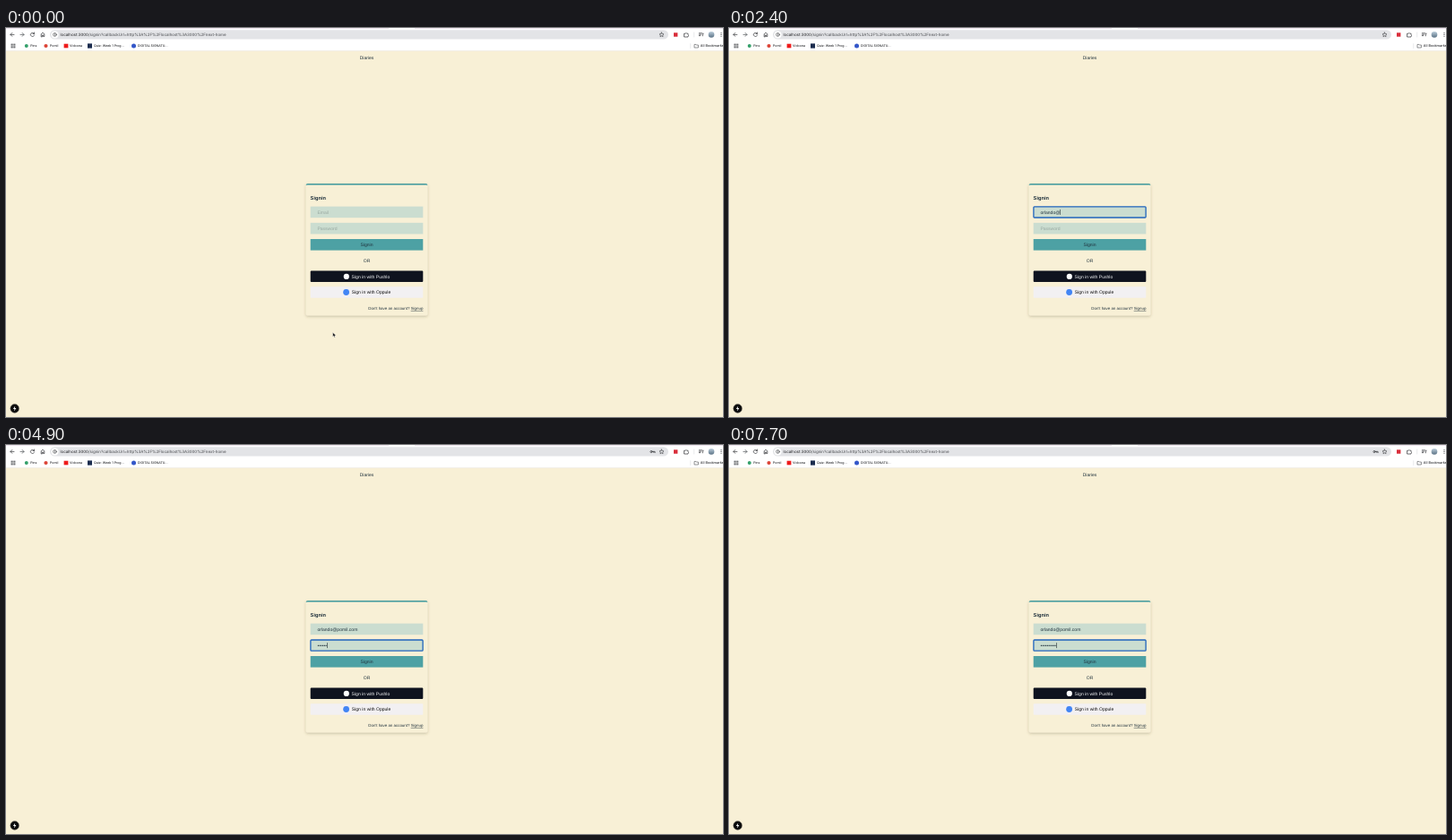
Write an HTML page that moves like this. It is 800 by 435 pixels and loops after 8 s.

```html
<!DOCTYPE html>
<html lang="en">
<head>
<meta charset="utf-8">
<title>Signin</title>
<style>
  html, body { margin: 0; width: 100%; height: 100%; overflow: hidden; background: #f8f0d6; }
  svg { display: block; width: 800px; height: 435px; }
  text { font: 5.05px "Liberation Sans", Arial, sans-serif; fill: #20323d; text-rendering: geometricPrecision; white-space: pre; }
  .mid { text-anchor: middle; }
  .end { text-anchor: end; }
  .hint { fill: #98a8a0; }
  .ui text { font: 500 3.55px Inter, sans-serif; fill: #2c2d30; }
  .ui .url { font: 400 4.46px Inter, sans-serif; fill: #45474b; }
  .ui .host { fill: #1c1d20; }
  .line { fill: none; stroke: #3b3d41; stroke-width: .75; stroke-linecap: round; stroke-linejoin: round; }
  .menu text { font: 400 4.05px "Liberation Sans", sans-serif; fill: #e4e4e8; }
  .menu .bold { font-weight: 700; fill: #fff; }
  .ring { fill: none; stroke: #2265bd; stroke-width: 1.3; }
</style>
</head>
<body>
<svg viewBox="0 0 800 435">
  <defs>
    <filter id="soft" x="-10%" y="-10%" width="120%" height="125%">
      <feDropShadow dx="0" dy="1.2" stdDeviation="1.5" flood-color="#5b5030" flood-opacity=".3"/>
    </filter>
    <linearGradient id="face" x2="0" y2="1">
      <stop stop-color="#b9cbd8"/><stop offset="1" stop-color="#5c7386"/>
    </linearGradient>
  </defs>
  <rect width="800" height="435" fill="#f8f0d6"/>

  <g class="ui">
    <rect width="800" height="25.6" fill="#fff"/>
    <rect width="427" height=".8" fill="#eadfea"/>
    <rect x="456" width="344" height=".8" fill="#eadfea"/>
    <rect y="25.3" width="800" height=".5" fill="#e6e3dc"/>
    <rect x="49" y="2.2" width="690" height="10.4" rx="5.2" fill="#e3e4e7"/>
    <circle cx="54.5" cy="7.4" r="4" fill="#fff"/>
    <g class="line">
      <path d="M9 7.4H5M6.8 5.5 5 7.4 6.8 9.3"/>
      <path d="M16 7.4h4M18.2 5.5 20 7.4 18.2 9.3" stroke="#55585d"/>
      <path d="M31.3 6.2A2.1 2.1 0 1 0 31.6 8M31.6 5v1.5h-1.5"/>
      <path d="M39.2 9.5V6.8L41 5.2l1.8 1.6v2.7h-1.2V8h-1.2v1.5z"/>
      <circle cx="54.5" cy="7.4" r="1.9" stroke-width=".6"/>
      <path d="M54.5 7.2v1.1M54.5 6.3v.05" stroke-width=".5"/>
      <path d="m731.5 5 .75 1.6 1.75.2-1.3 1.2.35 1.7-1.55-.85-1.55.85.35-1.7-1.3-1.2 1.75-.2z" stroke-width=".6"/>
      <path d="M757 6.2h1.2a.8.8 0 0 1 1.5 0H761v1.3a.8.8 0 0 1 0 1.5v1h-4z"/>
      <path d="M773.3 5.8h3.2M773.3 7.2h2.2M773.3 8.6h1.4"/>
      <path d="M777.3 8.8V6.2h.9"/>
      <path d="M767.7 5v5M763.7 17.7v4.8" stroke="#d2d5da" stroke-width=".5"/>
      <path d="M768 21.6v-3.2h1.7l.5.6h2.2v2.6z" stroke-width=".55"/>
    </g>
    <g id="key">
      <circle cx="720" cy="7.5" r="1.1" class="line"/>
      <path class="line" d="M721.2 7.3h2.9v1.3M722.8 7.4v1"/>
    </g>
    <rect x="745" y="5.3" width="4.4" height="4.4" fill="#d92d3a"/>
    <circle cx="787" cy="7.4" r="3.3" fill="url(#face)"/>
    <g id="dots" fill="#3b3d41"></g>
    <text class="url" x="60.4" y="9"><tspan class="host">localhost:3000</tspan>/signin?callbackUrl=http%3A%2F%2Flocalhost%3A3000%2Fnext-home</text>

    <circle cx="22.8" cy="20" r="2" fill="#34a06a"/>
    <text x="27.2" y="21.3">Pins</text>
    <circle cx="44.5" cy="20" r="2.1" fill="#dc4437"/>
    <text x="49" y="21.3">Pomil</text>
    <rect x="64.6" y="17.7" width="4.8" height="4.6" fill="#ee1c1c"/>
    <text x="71" y="21.3">Vidoona</text>
    <rect x="91" y="17.4" width="5" height="5.2" fill="#1c2c4e"/>
    <text x="98" y="21.3">Quiz: Week 1 Prog...</text>
    <circle cx="142.5" cy="20" r="2.5" fill="#3457c9"/>
    <text x="147" y="21.3">DIGITAL SIGNATU...</text>
    <text x="774.8" y="21.4" style="font-size:3.8px">All Bookmarks</text>
  </g>

  <text class="mid" x="402.5" y="34.9">Diaries</text>

  <g filter="url(#soft)">
    <rect x="334.6" y="174" width="135.8" height="147.6" rx="2" fill="#f8f0d6"/>
  </g>
  <path d="M334.6 176a2 2 0 0 1 2-2h131.8a2 2 0 0 1 2 2l-1.4-.6H336z" fill="#3f999d"/>
  <text x="339.6" y="191.8" style="font-size:5.68px;font-weight:700">Signin</text>
  <rect x="339.7" y="199.6" width="125.6" height="12.6" fill="#cbddd0"/>
  <rect x="339.7" y="217.8" width="125.6" height="12.6" fill="#cbddd0"/>
  <rect id="sel" y="220.6" height="6.8" fill="#86afe0"/>
  <text id="mail" x="347.4" y="207.6"></text>
  <text id="pass" x="347.4" y="225.8"></text>
  <rect id="ring" class="ring" x="339.9" width="125.2" height="12.2" rx="1"/>
  <rect id="caret" width=".6" height="6" fill="#222e33"/>
  <rect x="339.7" y="236" width="125.6" height="12.6" fill="#4da1a4"/>
  <text class="mid" x="402.5" y="244">Signin</text>
  <text class="mid" x="402.5" y="261.9">OR</text>
  <rect x="339.7" y="271.6" width="125.6" height="12.5" rx="1" fill="#0f131f"/>
  <circle cx="379.8" cy="277.9" r="3.1" fill="#fff"/>
  <text x="385.6" y="279.6" style="fill:#f2f3f5">Sign in with Pushlo</text>
  <rect x="339.7" y="289.3" width="125.6" height="12.5" rx="1" fill="#f2f0f2"/>
  <circle cx="379.6" cy="295.5" r="3.4" fill="#4285f4"/>
  <text x="385.8" y="297.3" style="fill:#111">Sign in with Oppule</text>
  <text class="end" x="465.4" y="315.3" style="font-size:4.42px">Don't have an account? <tspan text-decoration="underline">Signup</tspan></text>

  <g id="menu" class="menu">
    <path d="M374 215.8l3.2-3.6 3.2 3.6z" fill="#18181d"/>
    <rect x="370.8" y="215.3" width="77.6" height="28" rx="2" fill="#18181d"/>
    <rect x="370.8" y="229.2" width="77.6" height=".5" fill="#45454c"/>
    <g class="line" style="stroke:#c3c3ca;stroke-width:.55">
      <path d="M375.8 220.8h3.8v3h-3.8zM375.8 221.8h3.8"/>
      <circle cx="377.7" cy="236.6" r="1.9"/>
      <path d="M376.4 237.9c.4-1 2.2-1 2.6 0"/>
      <circle cx="377.7" cy="236" r=".6"/>
    </g>
    <text class="bold" x="384.8" y="223.8">orlando.danikis@student.uni...</text>
    <text x="384.8" y="238" style="font-size:4.3px">Manage Addresses...</text>
  </g>

  <circle cx="9.7" cy="425.5" r="4.9" fill="#0b0b0b" stroke="#8b8778" stroke-width=".4"/>
  <path d="M10.2 422.7l-2.3 3.2h1.6l-.4 2.5 2.3-3.3H9.8z" fill="#fff"/>

  <g id="mouse">
    <path id="arrow" d="M0 0v4.7l1.1-1 .75 1.7.75-.35-.7-1.6 1.5-.1z" fill="#111" stroke="#fff" stroke-width=".35"/>
    <path id="beam" d="M-.9-2.8q.9 0 .9.6v4.4q0 .6-.9.6M.9-2.8q-.9 0-.9.6v4.4q0 .6.9.6" fill="none" stroke="#222" stroke-width=".5"/>
  </g>
</svg>
<script>
const LOOP = 8000, ADDRESS = "orlando@pomil.com";
const FOCUS = 1000, TAB = 3600, SELECT = 6000, RETYPE = 6400;
const mailKeys = [1400, 1600, 1700, 1800, 1900, 2000, 2100, 2200,
                  2500, 2600, 2700, 2800, 2900, 3000, 3100, 3100, 3200];
// [time, password length]
const passKeys = [[4400, 1], [4500, 2], [4600, 3], [4700, 4], [4800, 5], [4900, 6],
                  [5400, 5], [5500, 4],
                  [6400, 1], [6500, 2], [6600, 3], [6700, 4], [6800, 5], [6900, 6], [7000, 7],
                  [7400, 8], [7500, 9], [7600, 10]];
const edits = [FOCUS, TAB, ...mailKeys, ...passKeys.map(k => k[0])];

const $ = id => document.getElementById(id);
const show = (id, on) => $(id).style.display = on ? "" : "none";
const set = (id, attrs) => { for (const k in attrs) $(id).setAttribute(k, attrs[k]); };

function dot(x, y, r) {
  const c = document.createElementNS("http://www.w3.org/2000/svg", "circle");
  c.setAttribute("cx", x); c.setAttribute("cy", y); c.setAttribute("r", r);
  $("dots").append(c);
}
for (let i = 0; i < 3; i++) {
  dot(798, 5.6 + i * 1.8, .55);
  for (let j = 0; j < 3; j++) dot(6.2 + i * 1.8, 18.2 + j * 1.8, .68);
}

function fill(id, value, hint) {
  const el = $(id);
  const next = value || hint;
  if (el.textContent !== next) el.textContent = next;
  el.classList.toggle("hint", !value);
  return value ? el.getComputedTextLength() : 0;
}

function draw(t) {
  const mail = ADDRESS.slice(0, mailKeys.filter(k => k <= t).length);
  const count = passKeys.filter(k => k[0] <= t).reduce((n, k) => k[1], 0);
  const mailW = fill("mail", mail, "Email");
  const passW = fill("pass", "•".repeat(count), "Password");

  const focused = t >= FOCUS, onPass = t >= TAB;
  const selected = t >= SELECT && t < RETYPE;
  const last = Math.max(0, ...edits.filter(e => e <= t));
  show("ring", focused);
  set("ring", { y: onPass ? 218 : 199.8 });
  show("caret", focused && !selected && (t - last) % 1000 < 500);
  set("caret", { x: 347.4 + (onPass ? passW : mailW), y: onPass ? 221.1 : 202.9 });
  show("sel", selected);
  set("sel", { x: 347.4, width: passW });
  show("menu", focused && t < mailKeys[7]);
  show("key", t >= passKeys[0][0]);

  const p = Math.min(1, Math.max(0, (t - 200) / 600)), e = p * p * (3 - 2 * p);
  const x = 364.7 + 12.3 * e, y = 340.6 - 134.6 * e;
  const overField = y < 212 || (y > 218 && y < 230);
  show("mouse", t < mailKeys[0]);
  set("mouse", { transform: `translate(${x} ${y})` });
  show("arrow", !overField);
  show("beam", overField);
}

const start = performance.now();
function tick() {
  const t = (performance.now() - start) % LOOP;
  draw(Math.floor(t / 100) * 100);
  requestAnimationFrame(tick);
}
tick();
</script>
</body>
</html>
```
